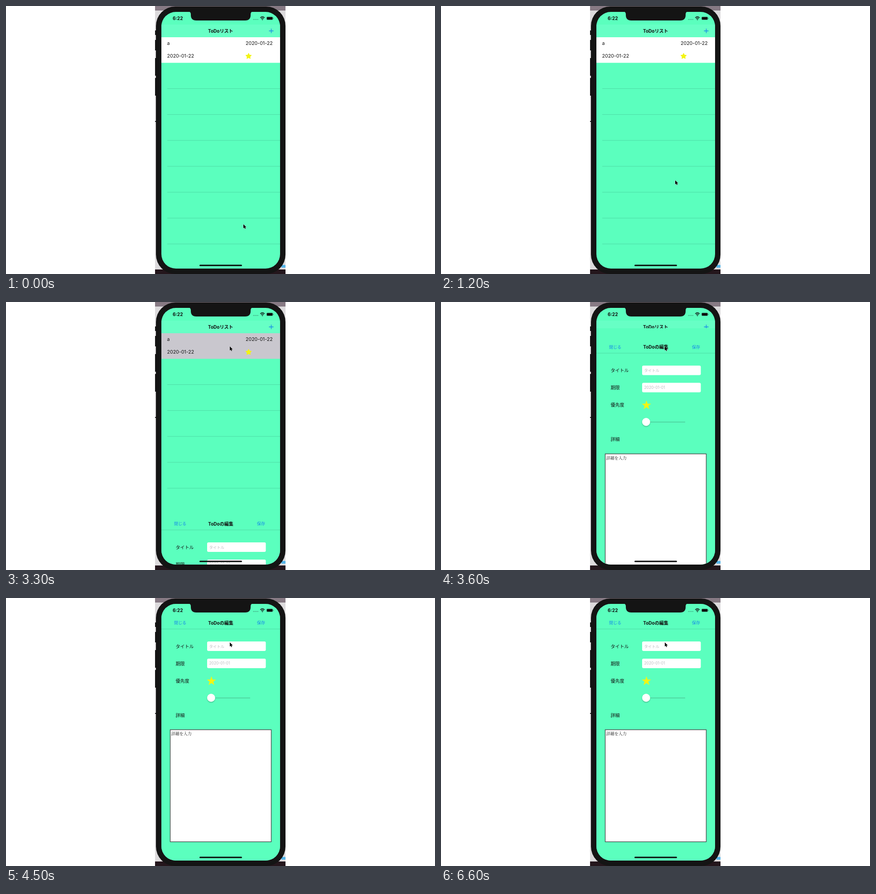
An HTML page for the animation above (7200 ms loop, 947 by 592 pixels).

```html
<!DOCTYPE html>
<html lang="ja">
<head>
<meta charset="utf-8">
<title>ToDo</title>
<style>
  html, body { margin: 0; width: 100%; height: 100%; overflow: hidden; background: #fff; }
  svg { display: block; width: 100%; height: 100%; }
  text { font: 10px Inter, "Noto Sans CJK JP", sans-serif; fill: #111; }
  .title { font-weight: 700; text-anchor: middle; }
  .cell { font-size: 10.6px; }
  .link { font-size: 9px; fill: #1589e8; }
  .hint { font-size: 8.4px; fill: #bcbcc0; }
  .memo { font: 9px "Noto Serif CJK JP", "Noto Serif", serif; }
  .line { stroke: #4ddba5; }
  .mint { fill: #5bffbe; }
  .star { fill: #f3f414; stroke: #f3f414; stroke-linejoin: round; }
</style>
</head>
<body>
<svg viewBox="0 0 947 592">
  <defs>
    <clipPath id="screen"><rect x="343" y="13" width="262" height="567" rx="32"/></clipPath>
    <filter id="soft" x="-50%" y="-50%" width="200%" height="200%">
      <feDropShadow dx="0" dy="1.5" stdDeviation="1.3" flood-opacity=".3"/>
    </filter>
  </defs>

  <!-- desktop behind the phone -->
  <rect x="329" width="288" height="592" fill="#dcdadc"/>
  <rect x="329" width="288" height="10" fill="#877a84"/>
  <rect x="329" y="582" width="288" height="10" fill="#24161c"/>
  <rect x="608" y="572" width="9" height="6" fill="#55b4e8"/>

  <path d="M330 54v10M330 75v23M330 115v39M330 159v39M330 254v2" stroke="#151515" stroke-width="2"/>
  <rect x="331" y="1" width="286" height="591" rx="43" fill="#141414"/>

  <g clip-path="url(#screen)">
    <rect class="mint" x="343" y="13" width="262" height="567"/>
    <rect x="343" y="41" width="262" height="28" fill="#67ffc5"/>
    <text class="title" x="473.7" y="58.5">ToDoリスト</text>
    <path d="M580.5 55h10M585.5 50v10" stroke="#1589e8" stroke-width="1.3"/>
    <rect id="row" x="343" y="69" width="262" height="56.5"/>
    <text class="cell" x="355.5" y="85.5">a</text>
    <text class="cell" x="529" y="85.5">2020-01-22</text>
    <text class="cell" x="355.5" y="114">2020-01-22</text>
    <path id="smallStar" class="star" stroke-width="1.4"/>
    <g id="lines" class="line"></g>

    <g id="sheet">
      <rect class="mint" x="343" y="13.5" width="262" height="567"/>
      <text class="link" x="371" y="58.3">閉じる</text>
      <text class="title" x="474" y="58.5">ToDoの編集</text>
      <text class="link" x="554" y="58.3">保存</text>
      <path class="line" d="M343 68.5h262"/>
      <text x="374.5" y="110.5">タイトル</text>
      <text x="374.5" y="148.5">期限</text>
      <text x="374.5" y="186.5">優先度</text>
      <text x="374.5" y="262.5">詳細</text>
      <g fill="#fff">
        <rect x="444" y="96" width="129.5" height="21" rx="3"/>
        <rect x="444" y="134" width="129.5" height="21" rx="3"/>
      </g>
      <text class="hint" x="448.5" y="109.5">タイトル</text>
      <text class="hint" x="448.5" y="147.3">2020-01-01</text>
      <path id="bigStar" class="star" stroke-width=".4"/>
      <path d="M445 220.7h94" stroke="#4cc99a" stroke-width="1.4"/>
      <circle cx="452.8" cy="220.4" r="8.8" fill="#fff" filter="url(#soft)"/>
      <rect x="362.5" y="291" width="223" height="247.5" fill="#fff" stroke="#484d4b" stroke-width="1.4"/>
      <text class="memo" x="364.8" y="303.3">詳細を入力</text>
    </g>

    <path d="M403 12q5 1 5 6v2q0 12 12 12h108q12 0 12-12v-2q0-5 5-6z" fill="#141414"/>
    <text x="368" y="31" font-weight="700" style="font-weight:700">6:22</text>
    <g fill="#3f9f7c">
      <circle cx="546.5" cy="29.7" r="1"/><circle cx="549.6" cy="29.7" r="1"/>
      <circle cx="552.7" cy="29.7" r="1"/><circle cx="555.8" cy="29.7" r="1"/>
    </g>
    <g fill="none" stroke="#111" stroke-width="1.6">
      <path d="M561.2 26q4.8-4.2 9.6 0M563.1 28.2q2.9-2.4 5.8 0"/>
      <path d="M566 31.2l-1.2-1.4q1.2-.8 2.4 0z" fill="#111" stroke-width=".6"/>
    </g>
    <rect x="575" y="23.8" width="14.2" height="7" rx="2" fill="#3a8a6d"/>
    <rect x="576" y="24.6" width="12.2" height="5.4" rx="1.2" fill="#0c0c0c"/>
    <path d="M590.4 26v2.6" stroke="#3a8a6d"/>
    <rect x="427" y="571.5" width="94" height="3" rx="1.5" fill="#080808"/>
  </g>

  <path id="cursor" d="M0 0v9.2l2.1-1.9 1.4 3.2 1.6-.7-1.4-3.1h2.9z" fill="#000" stroke="#fff" stroke-width=".8" paint-order="stroke"/>
</svg>
<script>
const $ = id => document.getElementById(id);
const LOOP = 7200, STEP = 300;
const sheetSteps = [435, 44.5, 4.2, 0];
const cursorKeys = [[0, 524, 482], [1200, 517, 385], [2700, 494, 98]];

function starPath(cx, cy, r, inner) {
  const points = Array.from({ length: 10 }, (_, i) => {
    const a = i * Math.PI / 5, d = i % 2 ? r * inner : r;
    return `${cx + d * Math.sin(a)} ${cy - d * Math.cos(a)}`;
  });
  return `M${points.join('L')}Z`;
}

function cursorAt(t) {
  const next = cursorKeys.findIndex(key => key[0] > t);
  if (next < 0) return cursorKeys.at(-1).slice(1);
  const [a, b] = [cursorKeys[next - 1], cursorKeys[next]];
  const k = (t - a[0]) / (b[0] - a[0]);
  return [1, 2].map(i => a[i] + (b[i] - a[i]) * k);
}

function draw(now) {
  const t = Math.floor(now % LOOP / STEP) * STEP;
  const opened = t / STEP - 11;
  const y = opened < 0 ? 580 : sheetSteps[Math.min(opened, 3)];
  $('sheet').setAttribute('transform', `translate(0 ${y})`);
  $('row').setAttribute('fill', opened < 0 ? '#fff' : '#c9c7ce');
  $('cursor').setAttribute('transform', `translate(${cursorAt(t)})`);
  requestAnimationFrame(draw);
}

$('smallStar').setAttribute('d', starPath(535.5, 110.9, 6.2, .5));
$('bigStar').setAttribute('d', starPath(453.5, 183.6, 10.3, .4));
for (let i = 0; i < 7; i++)
  $('lines').innerHTML += `<path d="M356 ${182.5 + i * 57.2}h249"/>`;
draw(performance.now());
</script>
</body>
</html>
```
